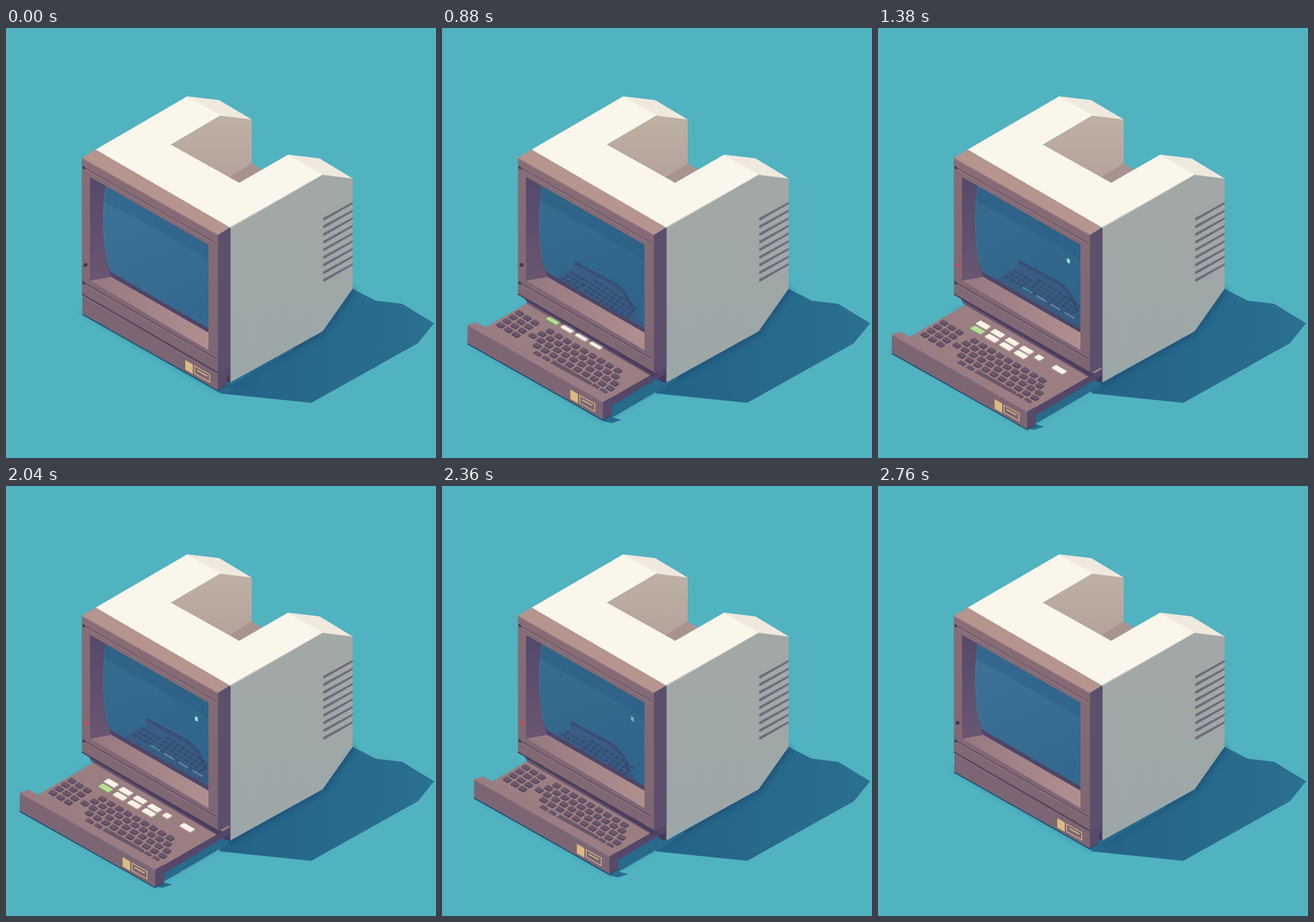
Animation, 686 px wide and 686 px high, one loop 3660 ms. Source, as an HTML page:

```html
<!DOCTYPE html>
<html lang="en">
<head>
<meta charset="utf-8">
<title>Terminal</title>
<style>
html, body { margin: 0; width: 100%; height: 100%; overflow: hidden; background: #51b2c0; }
svg { display: block; width: 100vw; height: 100vh; }
</style>
</head>
<body>
<svg id="stage" viewBox="0 0 686 686" preserveAspectRatio="xMidYMid meet">
  <defs>
    <linearGradient id="glass" x1="0" y1="0" x2=".3" y2="1">
      <stop offset="0" stop-color="#407496"/><stop offset="1" stop-color="#34688f"/>
    </linearGradient>
    <linearGradient id="wall" x1="0" y1="0" x2="0" y2="1">
      <stop offset="0" stop-color="#beb0a3"/><stop offset="1" stop-color="#b5a39b"/>
    </linearGradient>
    <linearGradient id="side" x1="0" y1="0" x2="0" y2="1">
      <stop offset="0" stop-color="#a2a8a5"/><stop offset="1" stop-color="#9ca7a8"/>
    </linearGradient>
    <linearGradient id="face" x1="0" y1="0" x2="0" y2="1">
      <stop offset="0" stop-color="#886d76"/><stop offset="1" stop-color="#7d6673"/>
    </linearGradient>
    <linearGradient id="sill" x1="0" y1="0" x2="1" y2="0">
      <stop offset="0" stop-color="#957880"/><stop offset="1" stop-color="#b08f8f"/>
    </linearGradient>
    <linearGradient id="jamb" x1="0" y1="0" x2="0" y2="1">
      <stop offset="0" stop-color="#54496b"/><stop offset="1" stop-color="#6a5671"/>
    </linearGradient>
    <linearGradient id="cast" x1="0" y1="0" x2="1" y2="0">
      <stop offset="0" stop-color="#246285"/><stop offset="1" stop-color="#2a7090"/>
    </linearGradient>
    <filter id="soft" x="-20%" y="-20%" width="140%" height="140%">
      <feGaussianBlur stdDeviation="5"/>
    </filter>
    <clipPath id="front"><path d="M0 0H357V686H0Z"/></clipPath>
    <clipPath id="tube">
      <path d="M159 252L323 346V479L172 392Q164 388 161 374Q150 310 159 252Z"/>
    </clipPath>
  </defs>
  <g id="ground"></g>
  <g id="caseBody"></g>
  <g clip-path="url(#front)"><g id="tray"></g></g>
  <g id="lip"></g>
  <g id="panel"></g>
  <g id="bezel"></g>
  <g clip-path="url(#tube)">
    <g id="screen"></g>
    <g id="mirror"></g>
    <g id="tint"></g>
  </g>
</svg>
<script>
const NS = 'http://www.w3.org/2000/svg';
const LOOP = 3660;
const $ = id => document.getElementById(id);

function path(group, d, fill, more = {}) {
  const el = document.createElementNS(NS, 'path');
  el.setAttribute('d', d);
  el.setAttribute('fill', fill);
  for (const k in more) el.setAttribute(k, more[k]);
  $(group).appendChild(el);
  return el;
}
const poly = (group, pts, fill, more) => path(group, 'M' + pts + 'Z', fill, more);
const line = (group, d, stroke, width, more = {}) =>
  path(group, d, 'none', { stroke, 'stroke-width': width, ...more });

// A flat tile on the tray: a is the half width to the right, b the half depth to the back.
function tile(group, x, y, a, b, fill, more) {
  const ay = a * .577, by = b * .577;
  poly(group, `${x - a - b} ${y - ay + by}L${x - a + b} ${y - ay - by}` +
    `L${x + a + b} ${y + ay - by}L${x + a - b} ${y + ay + by}`, fill,
    { stroke: fill, 'stroke-width': 1.2, 'stroke-linejoin': 'round', ...more });
}
function key(x, y, a = 3.8, b = 2.8, top = '#6a5869', edge = '#4e3f59') {
  tile('tray', x, y + 1.4, a, b, edge);
  tile('tray', x, y - .4, a, b, top);
}
function row(x, c, count, step) {
  for (let i = 0; i < count; i++) key(x + i * step, c + (x + i * step) * .577);
}

let drawerShade, drawerGlow;
function buildGround() {
  poly('ground', '118 452L340 580L360 572L480 505L260 400', '#2d7f9b', { filter: 'url(#soft)', opacity: .45 });
  poly('ground', '338 575L342 583L487 598L657 503L683 471L632 440L590 435L553 416L400 480', 'url(#cast)');
  line('ground', 'M352 568L504 484L553 416', '#1d4d73', 12, { filter: 'url(#soft)', opacity: .7 });
  drawerGlow = poly('ground', '24 514L238 638L250 634L340 580L200 440', '#2d7f9b', { filter: 'url(#soft)', opacity: .4 });
  drawerShade = poly('ground', '24 516L238 638L252 641L268 636L253 632L358 571V500L200 440', '#276a8a');
}

function buildCase() {
  poly('caseBody', '263 186L343 139L392 146V219L357 240', 'url(#wall)');
  poly('caseBody', '355 239L392 216L409 226L372 248', '#a8948f');
  poly('caseBody', '289 109L340 115L392 146L343 140', '#efe9de');
  poly('caseBody', '450 202L500 208L553 240L504 235', '#efe9de');
  poly('caseBody', '143 194L289 109L343 139L263 186L372 247L450 202L505 234L358 319', '#faf6eb');
  poly('caseBody', '357 318L505 234L553 240V416L505 484L357 566', 'url(#side)');
  line('caseBody', 'M358 319L505 234L553 240', '#d5d5cd', 1);
  for (let i = 0; i < 9; i++) {
    const y = 303 + i * 12.2;
    poly('caseBody', `506 ${y}L553 ${y - 25.5}V${y - 22}L508 ${y + 3.8}H506`, '#706a7d');
  }
  poly('caseBody', '338 549L358 537V566L350 564L338 556', '#443b60');
}

function buildTray() {
  poly('tray', '252 604L382 529V540L252 618', '#554768');
  poly('tray', '36 485L50 493L180 418L382 529L252 604L238 612', '#9a7e81');
  line('tray', 'M252 604L382 529', '#a88a8c', 1);

  for (let r = 0; r < 4; r++)
    for (let c = 0; c < 3; c++) key(105 + c * 12.3 - r * 10, 470 + c * 7.5 + r * 6.4);
  row(154, 410, 9, 13.5);
  row(141, 421.6, 10, 13);
  row(126, 433.3, 11, 13.1);
  row(133, 445.3, 10, 13);
  row(133, 458.3, 2, 13.5);
  key(187, 565.5, 30);
  row(225, 457.3, 2, 13);

  const white = (x, y, a = 7.6) => key(x, y, a, 3.3, '#faf4e7', '#bfaaa6');
  for (let i = 0; i < 4; i++) white(168 + i * 23, 474 + i * 13.3);
  white(257, 526, 3.8);
  white(289, 545, 8.2);
  key(159, 482, 7.6, 3.3, '#b9e096', '#7d9f76');
  for (let i = 1; i < 4; i++) white(159 + i * 23, 482 + i * 13);
}

function buildPanel() {
  line('panel', 'M22 518.5L238 640L252 632', '#234f70', 3);
  poly('panel', '22 489L36 484.5L252 604L238 612', '#9a7d83');
  poly('panel', '238 612L252 604V632L238 640', '#584a69');
  poly('panel', '22 489L238 612V640L22 518', '#7c6674');
  line('panel', 'M22 489.5L238 612.5', '#957982', 1);
  poly('panel', '186 592L198 599V614L186 607', '#d9bb83');
  line('panel', 'M201 601.5L225 615V627L201 613.5Z', '#d9bb83', 1.3);
  line('panel', 'M205 608.5L221 617.5', '#d9bb83', 1.8);
}

let led;
function buildBezel() {
  poly('lip', '133 430L345 551V556L338 556L133 434', '#4d4064');
  poly('lip', '133 433L338 552V558L136 440', '#4b3d5e', { opacity: .6 });

  poly('bezel', '121 207L143 194L357 318L338 331', '#b6958f');
  poly('bezel', '338 330L357 318.5V541L338 551', '#5b4f6b');
  line('bezel', 'M357.5 319V565', '#564d67', 1.5);
  poly('bezel', '121 207L338 330V550L121 424', 'url(#face)');
  line('bezel', 'M121 207.5L338 330.5', '#9b7e83', 1.2);
  line('bezel', 'M122 221L336 344', '#695767', 1.5);
  line('bezel', 'M122 223L336 346', '#9b7f84', 1);
  line('bezel', 'M122 405L336 528', '#5d4d63', 1.5);
  line('bezel', 'M122 407L336 530', '#987c83', 1);
  line('bezel', 'M121 424.5L338 550', '#463a56', 2);
  line('bezel', 'M338 331V549', '#75606e', 1);
  poly('bezel', '122 220L126 222V226L122 224', '#453953');
  poly('bezel', '122 404L126 406V410L122 408', '#453953');

  poly('bezel', '134 238L323 346V514L134 403', '#4e4567');
  poly('bezel', '134 238L160 252V374L168 397L134 403', 'url(#jamb)');
  poly('bezel', '134 403L168 397L323 486V514', 'url(#sill)');
  led = path('bezel', 'M124 378a3 3 0 1 0 6 0a3 3 0 1 0-6 0Z', '#41354f');
}

let dim, cursor, mirror, buttons;
function buildScreen() {
  path('screen', 'M140 230H330V500H140Z', 'url(#glass)');
  path('screen', 'M150 245L330 348V374Q240 320 150 273Z', '#2f6288', { opacity: .55 });
  line('screen', 'M159 252Q150 310 161 374Q164 388 172 392', '#5688a5', 1.5, { opacity: .5 });
  dim = path('screen', 'M140 230H330V500H140Z', '#1d5472');

  mirror = $('mirror');
  path('mirror', 'M222 372Q226 369 234 374L285 402Q311 416 321 450L360 540L190 420L188 402L212 386L223 383Z',
    '#43527c', { opacity: .5 });
  line('mirror', 'M224 374Q227 373 234 378L283 404Q308 417 318 452', '#38496f', 5, { opacity: .6 });
  const ink = { opacity: .55, 'stroke-width': .5 };
  for (let r = 0; r < 3; r++)
    for (let c = 0; c < 4; c++) tile('mirror', 220 + c * 8 - r * 7, 389 + c * 4.6 + r * 4.5, 2.5, 1.8, '#304466', ink);
  for (let r = 0; r < 4; r++)
    for (let c = 0; c < 9; c++) tile('mirror', 258 + c * 8 - r * 5, 403 + c * 5.1 + r * 5, 2.5, 1.8, '#304466', ink);
  buttons = [];
  for (let i = 0; i < 4; i++)
    buttons.push(tileBar(238 + i * 22.5, 418 + i * 13.5, i ? '#8598ac' : '#4d9c91'));

  cursor = poly('tint', '301.5 367L306 369.3V376L301.5 373.7', '#8fe9e0');
}
const tileBar = (x, y, color) =>
  line('mirror', `M${x - 8} ${y - 4.6}L${x + 8} ${y + 4.6}`, color, 2.5);

function smooth(a, b, t) {
  const u = Math.min(1, Math.max(0, (t - a) / (b - a)));
  return u * u * (3 - 2 * u);
}

function draw(t) {
  const open = smooth(360, 1080, t) - smooth(2140, 2760, t);
  const back = 1 - open;
  const sunk = smooth(.92, 1, open);
  const x = 100 * back, y = -57.7 * back;
  const slide = `translate(${x} ${y - 4.5 * (1 - sunk)})`;
  for (const el of [$('tray'), $('panel')]) el.setAttribute('transform', slide);
  for (const el of [drawerShade, drawerGlow]) el.setAttribute('transform', `translate(${x - 3 * sunk} ${y})`);

  mirror.setAttribute('transform', `translate(${-66 * back} ${55 * back * back})`);
  mirror.setAttribute('opacity', smooth(.3, .68, open));
  for (const el of buttons) el.setAttribute('opacity', .7 * smooth(.82, .98, open));
  dim.setAttribute('opacity', .2 * smooth(.2, .85, open));

  const on = t >= 1120 && t < 2560;
  led.setAttribute('fill', on ? '#cf4860' : '#41354f');
  const pulse = .8 + .2 * Math.cos((t - 1380) / 660 * 2 * Math.PI);
  cursor.setAttribute('opacity', on ? pulse : 0);
}

buildGround();
buildCase();
buildTray();
buildPanel();
buildBezel();
buildScreen();

const start = performance.now();
function tick() {
  draw((performance.now() - start) % LOOP);
  requestAnimationFrame(tick);
}
draw(0);
requestAnimationFrame(tick);
</script>
</body>
</html>
```
